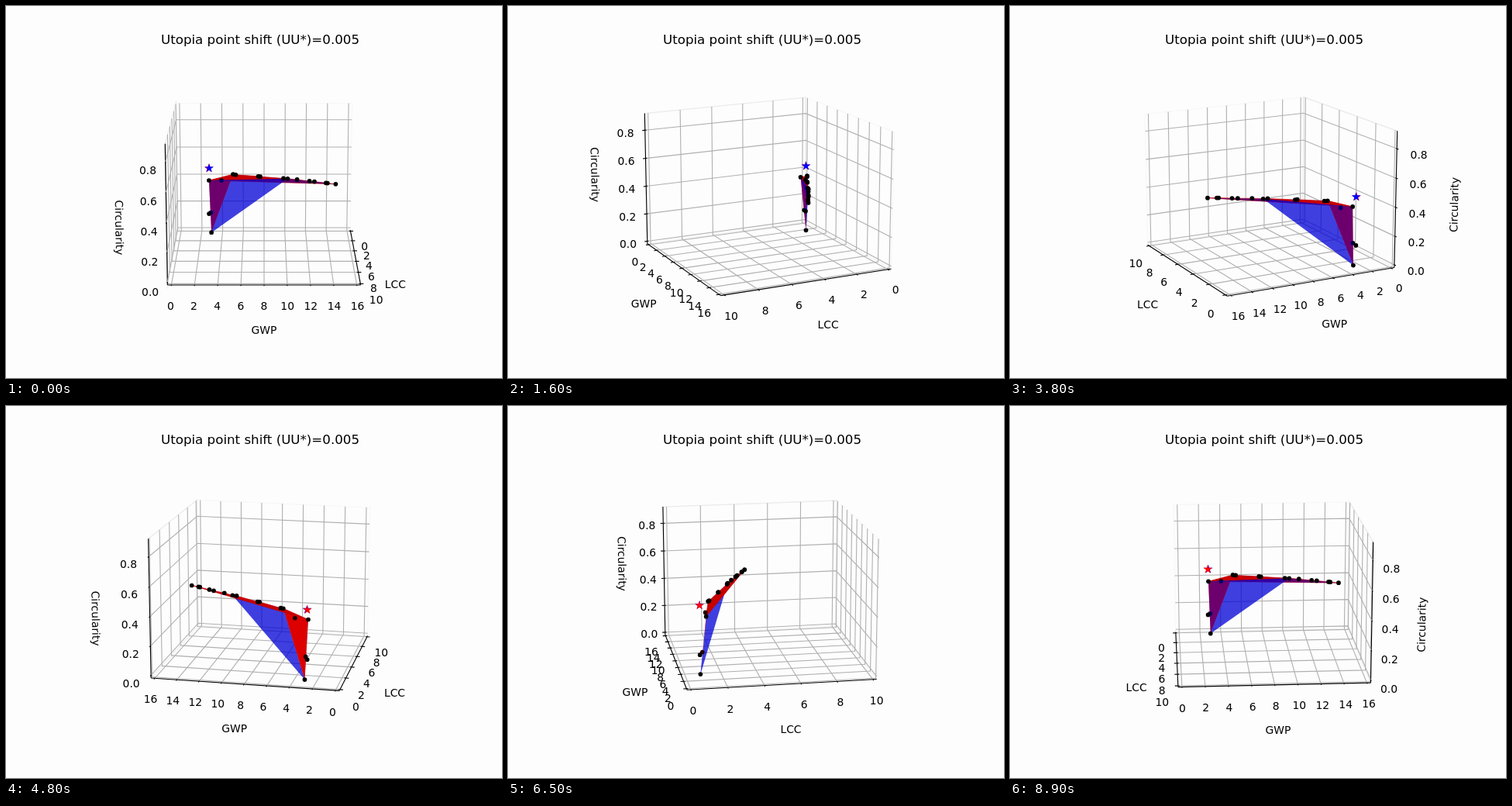
An HTML page with a canvas for the animation above (9 s loop, 640x480 px).

```html
<!DOCTYPE html>
<html lang="en">
<head>
<meta charset="utf-8">
<title>Rotating Pareto front</title>
<style>
html, body { margin: 0; width: 100%; height: 100%; overflow: hidden; background: #fdfdfd; }
canvas { display: block; }
</style>
</head>
<body>
<canvas id="stage" width="640" height="480"></canvas>
<script>
const ctx = document.getElementById('stage').getContext('2d');
const FONT = '"DejaVu Sans", sans-serif';
const HALF = [4 / 7, 4 / 7, 3 / 7];          // half size of the data box
const EDGE = 25 / 24;                        // panes sit a little outside it
const TICK_PAD = EDGE + 1.037 / 6, NAME_PAD = EDGE + 2.796 / 6;
const ELEV = Math.PI / 12, CE = Math.cos(ELEV), SE = Math.sin(ELEV);
const LINE = 1.11;
const BLUE = 'rgba(0,0,215,.5)', SIDE_RED = '#dc0000', TOP_RED = '#c80000';

const axes = [
  { name: 'LCC', max: 10, step: 2, digits: 0, tickDir: 1, pane: '#f8f8f8' },
  { name: 'GWP', max: 16, step: 2, digits: 0, tickDir: 0, pane: '#ebebeb' },
  { name: 'Circularity', max: 0.9, step: 0.2, digits: 1, tickDir: 0, pane: '#f5f5f5' }
];
for (const ax of axes) {
  ax.ticks = [];
  for (let k = 0; k * ax.step <= ax.max + 1e-9; k++) ax.ticks.push(k * ax.step);
}

// LCC, GWP, Circularity
const toBox = p => p.map((v, i) => HALF[i] * (2 * v / axes[i].max - 1));
const corner = toBox([1.13, 2.80, 0.396]);
const foot = toBox([0.80, 2.97, 0]);
const ridge = [
  [1.44, 5.09, .45], [1.52, 5.34, .449], [2.21, 7.46, .459], [2.25, 7.64, .458],
  [2.94, 9.79, .467], [3.01, 10.18, .467], [3.30, 11.04, .47], [3.66, 12.16, .47],
  [3.80, 12.61, .471], [4.165, 13.64, .473], [4.21, 13.78, .473], [4.43, 14.51, .473]
].map(toBox);
const knee = ridge[0], mid = ridge[5], tip = ridge[11];
const inner = [[1.19, 3.98, .398], [.915, 2.94, .152]].map(toBox);
const outer = [corner, foot, toBox([.765, 2.756, .138]), ...ridge];
const blueStar = toBox([.775, 2.81, .474]), redStar = toBox([.77, 2.77, .473]);

let ca = 1, sa = 0;
const depth = p => CE * (p[0] * ca + p[1] * sa) + SE * p[2];

function project(p) {
  const scale = 1997.84 / (10 - depth(p));
  const across = p[1] * ca - p[0] * sa;
  const up = CE * p[2] - SE * (p[0] * ca + p[1] * sa);
  return [333 + across * scale, 237.4 - up * scale];
}

function trace(points) {
  ctx.beginPath();
  for (const p of points) ctx.lineTo(...project(p));
}

function stroke(points, color, width = LINE) {
  trace(points);
  ctx.strokeStyle = color;
  ctx.lineWidth = width;
  ctx.stroke();
}

function fill(points, color) {
  trace(points);
  ctx.fillStyle = color;
  ctx.fill();
}

// Point given in units of the half box
const at = u => u.map((v, i) => v * HALF[i]);
const put = (u, i, v) => u.map((old, k) => k === i ? v : old);

function drawPane(i, wall) {
  const j = (i + 1) % 3, k = (i + 2) % 3;
  const ring = [[-1, -1], [-1, 1], [1, 1], [1, -1], [-1, -1]].map(([a, b]) =>
    at(put(put(wall, j, a * EDGE), k, b * EDGE)));
  stroke(ring, axes[i].pane, 1.39);
}

function drawAxis(i, wall) {
  const ax = axes[i], dir = ax.tickDir;
  const j = (i + 1) % 3, k = (i + 2) % 3;
  const flip = i === 0 ? 1 : 0;
  const edge = put(wall, flip, -wall[flip]);
  const ends = [edge, put(edge, i, -edge[i])].map(at);
  stroke(ends, '#000');

  const name = project(at(edge.map((v, n) => n === i ? 0 : Math.sign(v) * NAME_PAD)));
  const [a, b] = ends.map(project);
  let angle = 0;
  if (i === 2) {
    angle = Math.atan2(a[1] - b[1], b[0] - a[0]);
    if (angle > Math.PI / 2) angle -= Math.PI;
  }
  ctx.save();
  ctx.translate(...name);
  ctx.rotate(-angle);
  ctx.fillStyle = '#000';
  ctx.fillText(ax.name, 0, 4);
  ctx.restore();

  const places = ax.ticks.map(v => 2 * v / ax.max - 1);
  for (const v of places) {
    const q = put(wall, i, v);
    stroke([put(q, j, -q[j]), q, put(q, k, -q[k])].map(at), '#b0b0b0');
  }
  places.forEach((v, n) => {
    const q = put(edge, i, v), side = Math.sign(edge[dir]);
    stroke([EDGE - .1 / 6, EDGE + .2 / 6].map(r => at(put(q, dir, side * r))), '#000');
    const [x, y] = project(at(q.map((c, m) => m === i ? c : Math.sign(c) * TICK_PAD)));
    ctx.fillStyle = '#000';
    ctx.fillText(ax.ticks[n].toFixed(ax.digits), x, Math.round(y + 10.8));
  });
}

function dot(p, color = '#000') {
  ctx.beginPath();
  ctx.arc(...project(p), 2.85, 0, 2 * Math.PI);
  ctx.fillStyle = color;
  ctx.fill();
}

function star(p, color) {
  const [x, y] = project(p);
  ctx.beginPath();
  for (let n = 0; n < 10; n++) {
    const r = n % 2 ? 1.59 : 4.17, t = n * Math.PI / 5;
    ctx.lineTo(x + r * Math.sin(t), y - r * Math.cos(t));
  }
  ctx.closePath();
  ctx.fillStyle = ctx.strokeStyle = color;
  ctx.lineWidth = 1.2;
  ctx.fill();
  ctx.stroke();
}

function drawRed() {
  fill([corner, knee, foot], SIDE_RED);
  const top = [corner, ...ridge, corner];
  fill(top, TOP_RED);
  stroke(top, TOP_RED, .6);
}

function drawBlue() {
  fill([corner, mid, foot], BLUE);
  fill([corner, mid, tip], BLUE);
}

function drawSurfaces() {
  fill([knee, mid, foot], BLUE);
  if (depth(tip) > depth(corner)) {
    drawRed();
    inner.forEach(p => dot(p));
    drawBlue();
  } else {
    drawBlue();
    drawRed();
    inner.forEach(p => dot(p, '#200000'));
  }
}

function draw(time) {
  const turn = Math.floor(time / 100) % 90 * 4 * Math.PI / 180;
  ca = Math.cos(turn);
  sa = Math.sin(turn);
  const front = sa > -1e-9;
  const wall = [ca > 0 ? -EDGE : EDGE, front ? -EDGE : EDGE, -EDGE];

  ctx.fillStyle = '#fdfdfd';
  ctx.fillRect(0, 0, 640, 480);
  ctx.textAlign = 'center';
  ctx.font = '13.89px ' + FONT;
  axes.forEach((_, i) => drawPane(i, wall));
  axes.forEach((_, i) => drawAxis(i, wall));

  drawSurfaces();
  outer.forEach(p => dot(p));
  const stars = [[redStar, '#f00'], [blueStar, '#00f']];
  if (!front) stars.reverse();
  stars.forEach(s => star(...s));

  ctx.fillStyle = '#000';
  ctx.font = '16.67px ' + FONT;
  ctx.fillText('Utopia point shift (UU*)=0.005', 328, 49);
}

const start = performance.now();
function loop() {
  draw(performance.now() - start);
  requestAnimationFrame(loop);
}
loop();
</script>
</body>
</html>
```
